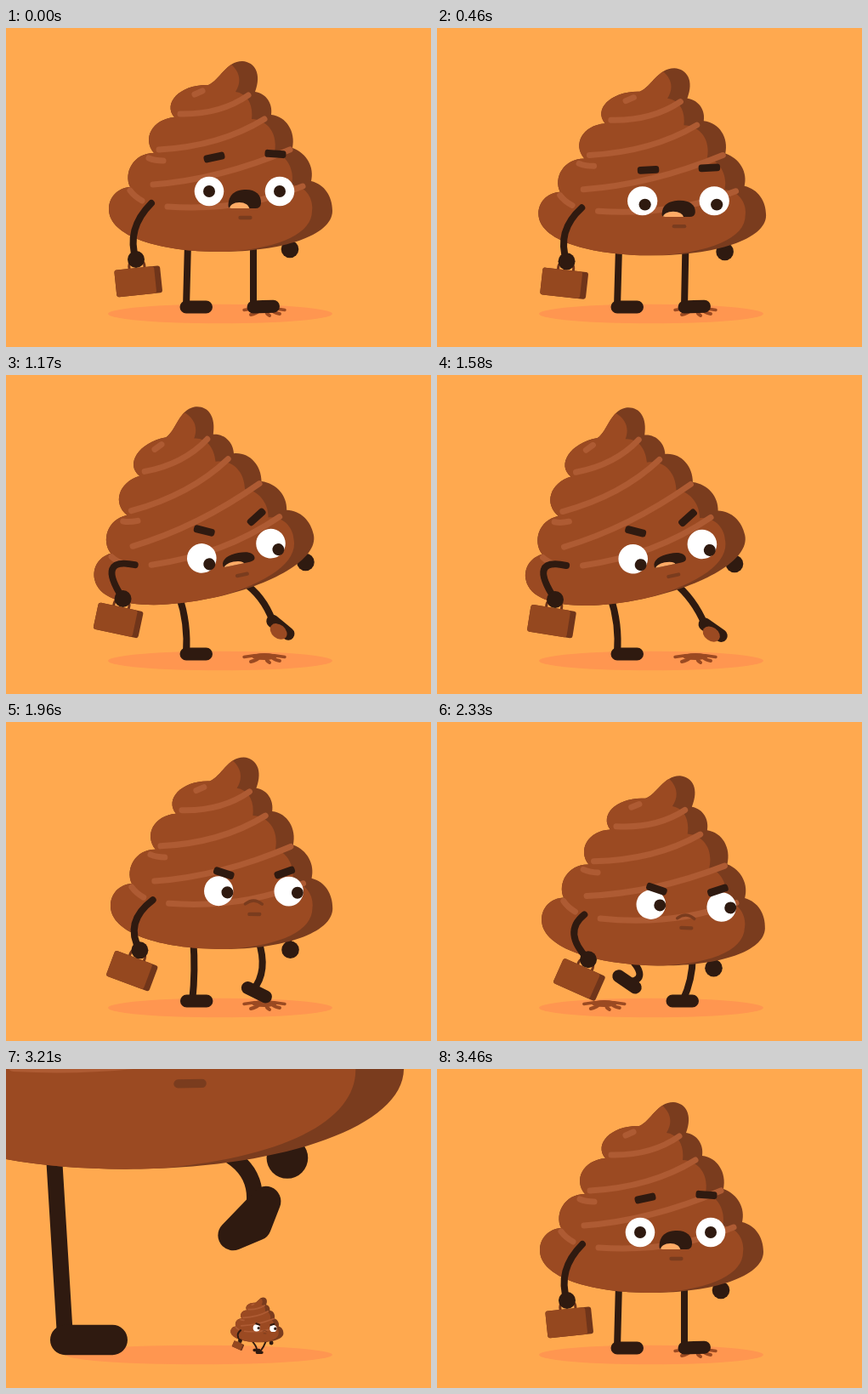
An HTML page with a canvas that plays this animation: 500 px wide and 375 px high, repeating every 3500 ms.

```html
<!DOCTYPE html>
<html lang="en">
<head>
<meta charset="utf-8">
<title>Stepped in it</title>
<style>
html, body { margin: 0; width: 100%; height: 100%; overflow: hidden; background: #ffa94f; }
canvas { display: block; width: 500px; height: 375px; }
</style>
</head>
<body>
<canvas id="stage" width="500" height="375"></canvas>
<script>
const ctx = document.getElementById('stage').getContext('2d');
const LOOP = 3500;
const C = {
  sky: '#ffa94f', shadow: '#ff9650', body: '#9b4a22', shade: '#7a3c1e', stripe: '#ae5b33',
  ink: '#2f1a10', white: '#fff', tongue: '#ffab66', bag: '#95481f', bagEdge: '#70351a'
};

const bodyShape = new Path2D(`M121 213 C121 199 131 188 146 187 C138 170 150 147 174 147
  C160 130 172 107 198 105 C184 88 205 66 238 67 C252 61 259 39 278 39
  C293 40 301 54 293 75 C307 77 314 90 312 102 C330 104 341 122 337 141
  C354 147 363 164 359 180 C375 184 384 198 384 215 C384 244 324 263 252 263
  C180 263 121 245 121 213 Z`);
const litShape = new Path2D(`M90 20 L262 20 L264 42 C276 52 277 64 270 75 C284 77 291 90 289 107
  C308 108 320 124 316 146 C331 150 340 168 336 184 C354 186 362 202 360 215
  C360 243 318 262 240 264 L90 290 Z`);
const stripes = new Path2D(`M205 101 Q252 102 285 79 M180 143 Q252 139 304 107
  M173 184 Q252 178 334 143 M190 210 Q276 216 349 186`);
const glints = new Path2D('M222 78 L231 74 M168 153 Q175 156 185 156 M146 191 Q151 198 160 203');
const mouthShape = new Path2D(`M-19 17 C-19 3 -10 -2 2 -2 C13 -2 20 4 19.5 14
  Q19 20 13 20 L-15 20 Q-19 20 -19 17 Z`);

const clamp = v => Math.max(0, Math.min(1, v));
const smooth = v => { v = clamp(v); return v * v * (3 - 2 * v); };
const span = (t, a, b) => smooth((t - a) / (b - a));
const rad = d => d * Math.PI / 180;

function mix(a, b, k) {
  if (typeof a === 'number') return a + (b - a) * k;
  if (Array.isArray(a)) return a.map((v, i) => mix(v, b[i], k));
  return Object.fromEntries(Object.keys(a).map(n => [n, mix(a[n], b[n], k)]));
}

// body: x, y, turn, squash; feet: heel x, y, turn, knee dx, dy, ankle along the foot;
// brows: dx, dy, turn twice
const shock = {
  body: [0, 0, 0, 1], face: [0, 0], pupil: [0, 0], brows: [6, -40, -12, -5, -44, 4], open: 1,
  arm: [141, 234, 154, 270], bag: 2, hand: [335, 260], hip: 0,
  left: [212, 328, 0, 0, 0, 0], right: [291, 328, -2, 0, 0, 0], bend: 0
};
const crouch = {
  ...shock, body: [1, 6, 0, 1.025], face: [3, 8], pupil: [4, 6], brows: [7, -36, 0, -6, -38, -6],
  open: 0.85, arm: [140, 240, 152, 276], bag: 8, hand: [340, 264]
};
const look = {
  ...shock, body: [-23, -2, -12, 1], face: [10.5, 22.7], pupil: [7.3, 8.7],
  brows: [9.6, -31, 26, -10, -34, -30], open: 0.6, arm: [100, 208, 117, 254], bag: 40,
  hand: [367, 206], left: [212, 328, 0, 3, 0, 0], right: [310, 273, 58, 14, -12, 0]
};
const reach = {
  ...look, body: [-25, -8, -13, 0.99], arm: [98, 202, 114, 248], bag: 46,
  hand: [374, 198], right: [310, 264, 64, 16, -12, 0]
};
const kick = {
  ...look, body: [-19, 1, -12, 1], arm: [106, 214, 139, 264], bag: 9,
  hand: [350, 222], left: [212, 328, 0, 7, -2, 0], right: [315, 293, 35, 5, -6, 0]
};
const wind = {
  ...kick, body: [-21, -3, -12, 1], arm: [104, 212, 132, 259], bag: 24,
  hand: [362, 212], right: [309, 275, 56, 13, -10, 0]
};
const jump = {
  ...shock, body: [0, -25, -2, 0.985], face: [10, 8], pupil: [10, 3], brows: [6, -24, 18, -5, -25, -18],
  open: 0.4, arm: [132, 215, 146, 250], bag: 16, hand: [346, 236], right: [285, 328, 0, 0, 0, 0]
};
const stomp = {
  ...shock, body: [-6, -20, -1, 1], face: [-4, -2], hand: [320, 237.5], arm: [134, 214, 146, 250],
  bag: 14, hip: -5, left: [209.5, 328, 0, 0, 0, 0], right: [293, 276, -46, 17, -8, 14], bend: 5
};
const land = { ...shock, body: [0, 4, 0, 1.02], bag: -10, hand: [337, 263] };
const settle = { ...shock, arm: [141, 236, 153, 272], bag: -6, hand: [334, 260] };

const acting = [
  [0, settle], [70, shock], [330, shock], [530, crouch], [700, reach], [790, look], [900, look],
  [1000, kick], [1100, wind], [1200, kick], [1290, wind], [1390, kick], [1480, wind],
  [1580, kick], [1690, kick], [1880, jump]
];
const stomping = [[3015, stomp], [3215, stomp], [3345, land], [3430, settle], [3500, settle]];

function play(keys, t) {
  const i = keys.findIndex(k => k[0] > t);
  if (i < 0) return keys[keys.length - 1][1];
  if (i === 0) return keys[0][1];
  const [t0, a] = keys[i - 1], [t1, b] = keys[i];
  return mix(a, b, span(t, t0, t1));
}

function step(q, x) {
  q -= Math.floor(q);
  if (q < 0.5) return [x + 21.6 - q * 86.4, 328, 0, 6, 0, 12];
  const s = (q - 0.5) * 2, up = Math.sin(Math.PI * s) ** 0.6;
  const turn = 85 * Math.exp(-(((s - 0.55) / 0.15) ** 2));
  return [x - 21.6 * Math.cos(Math.PI * s), 328 - 30 * up, turn, 6 + 24 * up, 14 * up, 12];
}

function walk(t) {
  const u = (t - 2330) / 270, q = u + 0.2;
  const y = 19 + 9 * Math.cos(4 * Math.PI * (q - 0.29));
  const swing = Math.cos(2 * Math.PI * u);
  return {
    body: [2, y, 2, 1], face: [10, -0.5], pupil: [10.5, 0.5], brows: [6, -18.5, 17, -5, -19.5, -20], open: 0,
    arm: [145 + swing * 2, y + 224, 171 + swing * 7, y + 256], bag: 24, hand: [325.5, y + 266], hip: 9,
    left: step(q + 0.5, 220), right: step(q, 273), bend: 0
  };
}

function heroPose(t) {
  return t < 1880 ? play(acting, t) : mix(jump, walk(t), span(t, 1880, 2030));
}

function stroke(color, width, path) {
  ctx.strokeStyle = color;
  ctx.lineWidth = width;
  path ? ctx.stroke(path) : ctx.stroke();
}

function curve(x0, y0, cx, cy, x1, y1, color, width) {
  ctx.beginPath();
  ctx.moveTo(x0, y0);
  ctx.quadraticCurveTo(cx, cy, x1, y1);
  stroke(color, width);
}

function oval(x, y, rx, ry, color) {
  ctx.beginPath();
  ctx.ellipse(x, y, rx, ry, 0, 0, Math.PI * 2);
  ctx.fillStyle = color;
  ctx.fill();
}

function box(x, y, w, h, r, color) {
  ctx.beginPath();
  ctx.roundRect(x, y, w, h, r);
  ctx.fillStyle = color;
  ctx.fill();
}

function placed(x, y, turn, draw) {
  ctx.save();
  ctx.translate(x, y);
  ctx.rotate(rad(turn));
  draw();
  ctx.restore();
}

// Where a point of the body lands once the body is posed
function onBody([dx, dy, turn, s], x, y) {
  const px = (x - 252) * s, py = 49 + (y - 263) / s;
  const c = Math.cos(rad(turn)), n = Math.sin(rad(turn));
  return [252 + dx + px * c - py * n, 214 + dy + px * n + py * c];
}

function leg(hip, [x, y, turn, kx, ky, ankle], bend, dirty) {
  const a = rad(turn), ex = x + Math.cos(a) * ankle, ey = y + Math.sin(a) * ankle;
  curve(...hip, (hip[0] + ex) / 2 + kx, (hip[1] + ey) / 2 + ky, ex, ey, C.ink, 8);
  placed(x, y, turn, () => {
    ctx.beginPath();
    ctx.moveTo(0, 0);
    ctx.lineTo(11.5, bend);
    ctx.lineTo(23.5, 0);
    ctx.closePath();
    ctx.fillStyle = C.ink;
    ctx.fill();
    stroke(C.ink, 15);
    if (dirty) oval(13, 5, 11, 8, C.body);
  });
}

function face(p) {
  const [lx, ly, lr, rx, ry, rr] = p.brows;
  ctx.save();
  ctx.translate(280.5 + p.face[0], 192 + p.face[1]);
  for (const x of [-41.5, 41.5]) {
    oval(x, 0, 17.3, 17.3, C.white);
    oval(x + p.pupil[0], p.pupil[1], 7, 7, C.ink);
  }
  placed(lx - 41.5, ly, lr, () => box(-12.5, -4.5, 25, 9, 3.5, C.ink));
  placed(rx + 41.5, ry, rr, () => box(-12.5, -4.5, 25, 9, 3.5, C.ink));
  if (p.open < 0.2) {
    curve(-10, 15, 0, 7, 10, 15, C.shade, 3.5);
  } else {
    ctx.save();
    ctx.translate(0, 10);
    ctx.scale(1, p.open);
    ctx.translate(0, -10);
    ctx.fillStyle = C.ink;
    ctx.fill(mouthShape);
    ctx.clip(mouthShape);
    oval(-6, 21, 12, 8, C.tongue);
    ctx.restore();
  }
  const chin = 26 + 5 * p.open;
  curve(-5, chin, 1, chin, 7, chin, C.shade, 4.3);
  ctx.restore();
}

function torso(p) {
  const [dx, dy, turn, s] = p.body;
  ctx.save();
  ctx.translate(252 + dx, 214 + dy);
  ctx.rotate(rad(turn));
  ctx.translate(0, 49);
  ctx.scale(s, 1 / s);
  ctx.translate(-252, -263);
  ctx.save();
  ctx.clip(bodyShape);
  ctx.fillStyle = C.shade;
  ctx.fillRect(90, 20, 320, 260);
  ctx.fillStyle = C.body;
  ctx.fill(litShape);
  stroke(C.stripe, 7, stripes);
  stroke(C.stripe, 7, glints);
  ctx.restore();
  face(p);
  ctx.restore();
}

function bag(x, y, turn) {
  placed(x, y, turn, () => {
    ctx.beginPath();
    ctx.roundRect(-9, 2, 18, 14, 5);
    stroke(C.bagEdge, 3);
    box(-27, 10, 54, 32, 3, C.bagEdge);
    box(-27, 10, 47, 32, 3, C.bag);
  });
}

function character(p, dirty) {
  const at = (x, y) => onBody(p.body, x, y);
  const [cx, cy, hx, hy] = p.arm;
  const back = at(322, 212);
  curve(...back, ...back, ...p.hand, C.ink, 8);
  oval(...p.hand, 10.3, 10.3, C.ink);
  leg(at(214 + p.hip, 252), p.left, 0, false);
  leg(at(291 + p.hip, 252), p.right, p.bend, dirty);
  torso(p);
  bag(hx, hy, p.bag);
  curve(...at(171, 206), cx, cy, hx, hy, C.ink, 8);
  oval(hx, hy, 10, 10, C.ink);
}

function splat(x) {
  ctx.save();
  ctx.translate(x, 332);
  oval(0, -1, 15, 4, C.body);
  curve(-24, -0.5, 0, -5, 24, -0.5, C.body, 3.5);
  curve(-6, 0, -10, 4, -16, 5, C.body, 4);
  curve(2, 0, 2, 4, 6, 6, C.body, 4);
  curve(9, 0, 12, 3, 18, 4, C.body, 4);
  ctx.restore();
}

function zoomed(x, scale, draw) {
  ctx.save();
  ctx.translate(x, 335);
  ctx.scale(scale, scale);
  ctx.translate(-x, -335);
  draw();
  ctx.restore();
}

function render(t) {
  const zoom = 10 ** (1 - span(t, 3015, 3350));
  const edge = 120 - 36 * (zoom - 1) * span(t, 2330, 2650);
  ctx.fillStyle = C.sky;
  ctx.fillRect(0, 0, 500, 375);
  oval((edge + 384) / 2, 336, (384 - edge) / 2, 11.3, C.shadow);

  if (t < 3015) {
    splat(304 - 0.32 * Math.max(0, t - 1996));
    character(heroPose(t), t > 560 && t < 1850);
    return;
  }
  if (t < 3335) zoomed(308, zoom / 10, () => character(heroPose(t), false));
  else splat(304);
  zoomed(312, zoom, () => character(play(stomping, t), false));
}

ctx.lineCap = ctx.lineJoin = 'round';
const start = performance.now();
function frame() {
  render((performance.now() - start) % LOOP);
  requestAnimationFrame(frame);
}
frame();
</script>
</body>
</html>
```
